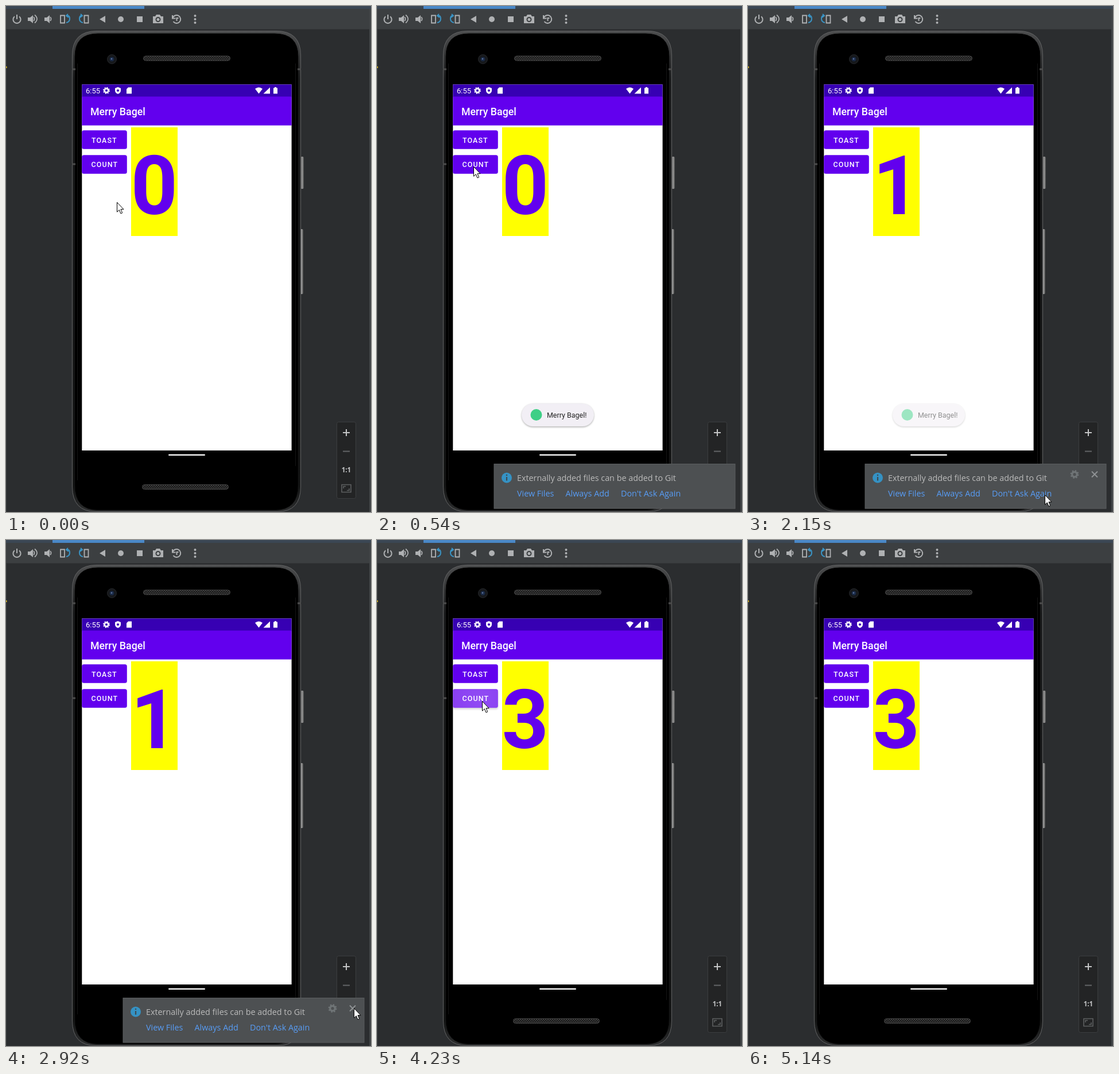
An HTML page that plays this animation: 636 px wide and 880 px high, repeating every 5540 ms.

```html
<!DOCTYPE html>
<html lang="en">
<head>
<meta charset="utf-8">
<title>Emulator</title>
<style>
html, body { margin: 0; width: 100%; height: 100%; overflow: hidden; background: #2b2d2f; }
svg { display: block; width: 636px; height: 880px; }
text { font-family: Roboto, sans-serif; white-space: pre; }
.ide text { font-family: "Open Sans", sans-serif; font-size: 14.35px; }
.btn { font-size: 12.46px; font-weight: 500; letter-spacing: 1.11px; fill: #fff; }
.line { fill: none; stroke: #afb1b3; stroke-width: 2; }
.blue { stroke: #3a94c5; }
</style>
</head>
<body>
<svg viewBox="0 0 636 880">
  <defs>
    <g id="gear" fill="none" stroke="currentColor">
      <circle r="3.4" stroke-width="2.6"/>
      <circle r="5" stroke-width="2" stroke-dasharray="1.96"/>
    </g>
    <rect id="button" x="132.2" width="78.600" height="32.600" rx="3.500"/>
    <pattern id="mesh" width="4" height="4" patternUnits="userSpaceOnUse">
      <rect width="4" height="4" fill="#171717"/>
      <path d="M0 0l4 4M4 0l-4 4" stroke="#444" stroke-width=".8"/>
    </pattern>
    <linearGradient id="rim" x2="0" y2="1">
      <stop stop-color="#4c4d4e"/><stop offset=".1" stop-color="#1d1e1f"/>
      <stop offset=".95" stop-color="#151616"/><stop offset="1" stop-color="#2c2d2e"/>
    </linearGradient>
    <linearGradient id="key">
      <stop stop-color="#333"/><stop offset=".5" stop-color="#a0a0a0"/><stop offset="1" stop-color="#4a4a4a"/>
    </linearGradient>
    <radialGradient id="wave" gradientUnits="userSpaceOnUse" cx="181" cy="276" r="58">
      <stop stop-color="#fff"/><stop offset="1" stop-color="#fff" stop-opacity=".8"/>
    </radialGradient>
    <filter id="soft" x="-20%" y="-40%" width="140%" height="200%"><feGaussianBlur stdDeviation="1.4"/></filter>
  </defs>

  <!-- window and toolbar -->
  <rect width="636" height="880" fill="#2b2d2f"/>
  <rect width="636" height="41" fill="#3c3f41"/>
  <rect width="636" height="5" fill="#3b4754"/>
  <rect x="81" width="160" height="5" fill="#4a88c7"/>
  <path d="M0 40.5H636" stroke="#323436"/>
  <path d="M634.5 5V880" stroke="#414446" stroke-width="3"/>
  <path d="M.5 41V880" stroke="#36393b"/>
  <rect y="105" width="1.5" height="3" fill="#d8b41c"/>
  <g class="line">
    <path d="M15 18.2a6.6 6.6 0 1 0 8 0M19 15v8"/>
    <path d="M48 19q3 3.5 0 7M50 15.5q8 7 0 14" stroke-width="1.7"/>
    <path d="M77 19q3 3.5 0 7" stroke-width="1.7"/>
    <path d="M95 16.500h7v13h-7zM136.500 16.500h7v13h-7z" stroke-width="1.8"/>
    <path class="blue" d="M105 29q6-1 6-7t-5-5M108 14l-3 3 4 3M134 29q-6-1-6-7t5-5M130 14l3 3-4 3"/>
    <path d="M290.5 21a7 7 0 1 1 1 6M290 16v5.5h5.5M297.5 26v-5h3"/>
  </g>
  <g fill="#afb1b3">
    <path d="M38 20h4l5-4v14l-5-4h-4zM67 20h4l5-4v14l-5-4h-4zM173 17v12l-10-6z"/>
    <circle cx="200" cy="23" r="5"/>
    <rect x="228" y="18" width="10" height="10"/>
    <path d="M256 18h4l2-3h6l2 3h4v12h-18z"/>
    <circle cx="265" cy="23.5" r="3.5" stroke="#3c3f41" stroke-width="2"/>
    <circle cx="329.500" cy="17" r="2"/><circle cx="329.500" cy="23" r="2"/><circle cx="329.500" cy="29" r="2"/>
  </g>

  <!-- phone -->
  <g fill="url(#key)"><rect x="513" y="262" width="6" height="56" rx="2"/><rect x="512" y="388" width="6" height="113" rx="2"/></g>
  <path d="M115.500 86Q115.500 43.500 158 43.500H471Q513.500 43.500 513.500 86V836Q513.500 879.500 473 879.500H157Q115.500 879.500 115.500 836Z" fill="url(#rim)" stroke="#626364"/>
  <path d="M120 88Q120 48 160 48H468Q509 48 509 88V833Q509 876.500 469 876.500H160Q120 876.500 120 833Z" stroke="#0b0b0b"/>
  <path d="M124.500 100V825M504.500 100V800" stroke="#141414"/>
  <path d="M115 110h6M115 275h6M508 110h6" stroke="#4c4c4c" stroke-width="3"/>
  <g fill="url(#mesh)" stroke="#484848">
    <rect x="239.500" y="87" width="151" height="8" rx="4"/><rect x="237.500" y="832.500" width="150" height="8" rx="4"/>
  </g>
  <circle cx="184.500" cy="92.500" r="8" fill="#16181b" stroke="#26282b"/>
  <circle cx="184.500" cy="92.500" r="3.800" fill="#1a2a47"/>
  <circle cx="184" cy="92" r="1.300" fill="#5f769c"/>
  <rect x="283" y="779.500" width="64" height="2.500" rx="1.200" fill="#eee"/>

  <!-- app screen -->
  <rect x="132.300" y="136.400" width="365.300" height="636.600" fill="#fff"/>
  <rect x="132.300" y="136.400" width="365.300" height="22" fill="#3700b3"/>
  <rect x="132.300" y="157.500" width="365.300" height="50.200" fill="#6200ee"/>
  <g fill="#fff" color="#fff">
    <text x="139" y="152" font-size="13">6:55</text>
    <use href="#gear" x="175" y="147"/>
    <path d="M195 141l5 2v4q0 4-5 6-5-2-5-6v-4z"/>
    <path d="M195 144.500l2.500 2.500-2.500 2.500-2.500-2.500z" fill="#3700b3"/>
    <path d="M213 141.500h6v11h-9v-8z"/>
    <path d="M434 144q6.500-5 13 0l-6.500 8.500zM460 141.500v11h-11.500zM466 142.500h2v-1.500h3v1.500h2v10h-7z"/>
    <text x="147" y="190" font-size="17.8" font-weight="500">Merry Bagel</text>
  </g>
  <g fill="#6200ee">
    <use href="#button" y="216.200"/>
    <use href="#button" id="lift" y="262" fill="#000" filter="url(#soft)"/>
    <use href="#button" y="259.200"/>
    <use href="#button" id="toastWave" y="216.200" fill="#fff"/>
    <rect id="countWave" x="132.200" y="259.200" width="78.600" height="32.600" rx="3.500" fill="url(#wave)"/>
    <rect x="218" y="211" width="81" height="189" fill="#ff0"/>
    <text id="number" x="217.500" y="361.700" font-size="142.400" font-weight="700">0</text>
  </g>
  <text class="btn" x="149" y="237.500">TOAST</text>
  <text class="btn" x="148.500" y="280.300">COUNT</text>
  <g id="toast">
    <rect x="252" y="692.500" width="126" height="40" rx="20" opacity=".3" filter="url(#soft)"/>
    <rect x="252" y="691.500" width="126" height="39.500" rx="19.750" fill="#f2eff5"/>
    <circle cx="277.500" cy="711" r="10" fill="#3ecf86"/>
    <text x="296" y="716" font-size="12.460" fill="#222">Merry Bagel!</text>
  </g>

  <!-- zoom panel and notice -->
  <g class="ide">
    <rect x="576.500" y="723.500" width="33" height="133" rx="3" fill="#232425" stroke="#3c3e40"/>
    <path d="M587 742h12M593 736v12" stroke="#c4c5c6" stroke-width="2"/>
    <path d="M587 774.500h12" stroke="#626466" stroke-width="2"/>
    <text x="593" y="810.500" text-anchor="middle" style="font-size:11.500px" font-weight="700" fill="#c4c5c6">1:1</text>
    <path d="M585 832.500h16v13h-16zM588 839v-3.500h4M598 839v3.500h-4" fill="none" stroke="#5d5f61" stroke-width="1.600"/>
    <g id="notice">
      <rect x="204" y="796.500" width="420" height="77.500" fill="#4d5052" stroke="#5a5d5f"/>
      <circle cx="226" cy="820.500" r="9" fill="#3592c4"/>
      <path d="M226 819v6.500M226 814.700v2.200" stroke="#3f4951" stroke-width="2.200"/>
      <text x="244" y="826" fill="#bbb">Externally added files can be added to Git</text>
      <g fill="#589df6"><text x="244" y="853">View Files</text><text x="328.500" y="853">Always Add</text><text x="425" y="853">Don't Ask Again</text></g>
      <g id="tools" color="#6f7476">
        <use href="#gear" transform="translate(569 814.500) scale(1.250)"/>
        <path d="M599 809.500l10 10m0-10l-10 10" stroke="#8f9294" stroke-width="2"/>
      </g>
    </g>
  </g>
  <path id="cursor" d="M.5.5V17.200L4.300 13.600 7 20 9.700 18.800 7 12.600H12Z" fill="#fff" stroke="#000"/>
</svg>
<script>
const LOOP = 5540, TICK = 131.7; // the screen refreshes once per tick; times below are in ticks
const COUNT_CLICKS = [8, 31, 32];

// Cursor stops: tick, x, y. It travels straight between them.
const stops = [
  [0, 193, 341], [1, 185, 232], [4, 168, 279], [9, 169, 279], // tap Toast, then Count
  [11, 204, 367], [12, 400, 800], [14, 493, 900],             // leave below the stage
  [15, 497, 868], [18, 556, 814], [21, 606, 814], [23, 606, 814], // close the notice
  [27, 164, 304], [29, 183, 280], [32, 183, 280],             // tap Count twice
  [34, 223, 416], [38, 532, 810], [39, 560, 900], [43, 560, 900]
];

const clamp = v => Math.min(1, Math.max(0, v));
const byId = id => document.getElementById(id);
const fade = (id, opacity) => byId(id).setAttribute("opacity", opacity);
const ripple = (tick, start, length = 5) =>
  tick < start ? 0 : .2 * clamp((tick - start + 1) / 2) * clamp((start + length - tick) / 2.5);

function cursorAt(tick) {
  const next = stops.findIndex(([end]) => end > tick);
  const [t0, x0, y0] = stops[next - 1], [t1, x1, y1] = stops[next];
  const part = (tick - t0) / (t1 - t0);
  return [x0 + (x1 - x0) * part, y0 + (y1 - y0) * part].map(Math.round);
}

function draw() {
  const tick = Math.floor(performance.now() % LOOP / TICK);
  const [x, y] = cursorAt(tick);
  const glow = COUNT_CLICKS.reduce((sum, click) => sum + ripple(tick, click), 0);
  byId("cursor").setAttribute("transform", `translate(${x} ${y})`);
  byId("number").textContent = COUNT_CLICKS.filter(click => click <= tick).length;
  fade("toastWave", ripple(tick, 1, 2));
  fade("countWave", glow);
  fade("lift", glow > .18 ? .15 : 0);
  fade("toast", clamp(Math.min((tick - 1) / 2, (18 - tick) / 4)));
  fade("notice", +(tick >= 4 && tick < 23));
  fade("tools", +(x > 204 && y > 796 && y < 874));
  requestAnimationFrame(draw);
}
draw();
</script>
</body>
</html>
```
